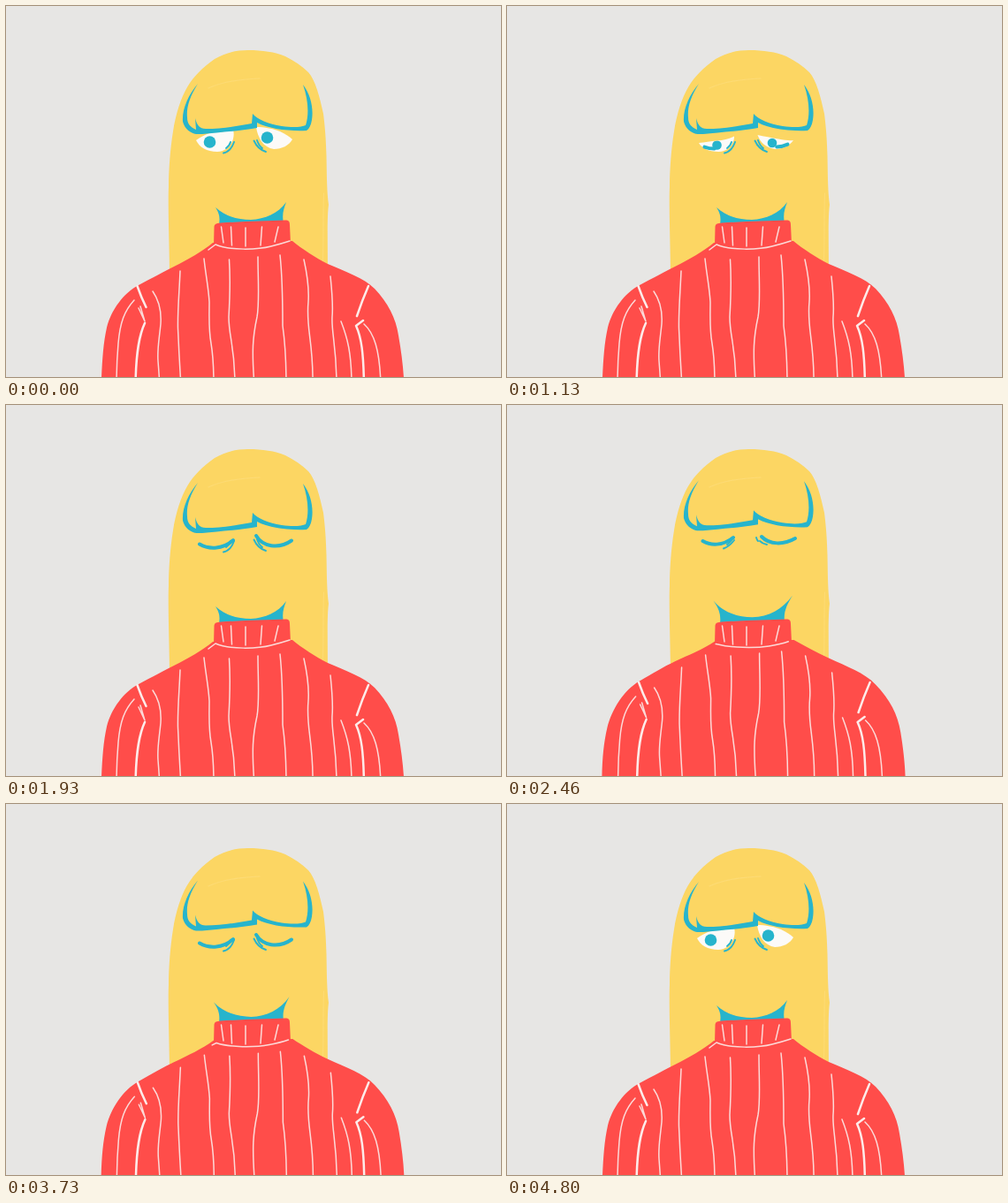
An HTML page that plays this animation: 560x420 px, repeating every 5000 ms.

```html
<!DOCTYPE html>
<html lang="en">
<head>
<meta charset="utf-8">
<title>Sigh</title>
<style>
  html, body { margin: 0; width: 100%; height: 100%; overflow: hidden; background: #e7e6e4; }
  svg { display: block; width: 560px; height: 420px; }
  .hair { fill: #fcd663; }
  .blue { fill: #27b4cc; }
  .red { fill: #ff4d4a; }
  .white { fill: #fcfaf8; }
  .line { fill: none; stroke-linecap: round; stroke-linejoin: round; }
  .ink { stroke: #27b4cc; }
  .knit { stroke: #fcdad8; }
  .shine { stroke: #fddb75; stroke-width: 1.1; }
</style>
</head>
<body>
<svg viewBox="0 0 560 420">
  <defs>
    <clipPath id="clipL"><path id="holeL"/></clipPath>
    <clipPath id="clipR"><path id="holeR"/></clipPath>
  </defs>

  <path class="hair" d="M185 305C185 280 183 225 184 205C184 185 186 160 189 142C192 122 198 104 205 92C212 80 222 70 236 60C248 53 260 50 274 50C290 50 304 52 316 57C326 62 335 68 342 75C350 84 355 103 359 122C361 138 362 152 362.500 170C363 195 363 210 365 225C363 240 364 270 364 305Z"/>
  <path class="line shine" d="M229 93C242 87 258 83 287 82M359.500 212C358.500 240 359.500 262 358.500 288"/>

  <path id="eyeL" class="white"/>
  <path id="eyeR" class="white"/>
  <g clip-path="url(#clipL)"><circle id="pupilL" class="blue"/></g>
  <g clip-path="url(#clipR)"><circle id="pupilR" class="blue"/></g>
  <path id="lashL" class="line ink" stroke-width="4" pathLength="100"/>
  <path id="lashR" class="line ink" stroke-width="4" pathLength="100"/>
  <path id="bagL" class="line ink" stroke-width="1.9"/>
  <path id="bagR" class="line ink" stroke-width="1.9"/>

  <path id="fringe" class="blue" d="M217 87C207 103 204 115 205 125C205 132 208 136 215 139L214 126C216 134 219 138 226 138C244 138 262 135 278 132L279 121C284 127 297 133 312 135C325 137 335 136 339 134C343 122 342 105 336 88C345 100 348 115 346 128C345 134 343 138 340 140C320 141 297 138 284 131L284 137C262 141 240 142 222 144C218 144 217 144 215 144C209 143 202 138 200 130C199 116 206 100 217 87Z"/>

  <path id="neck" class="blue"/>
  <path id="body" class="red"/>
  <path class="red" d="M235.500 251C235.500 247 237 246 243 245.500C270 244 295 243 316 242.500C320 242.500 321 244 321 248L322 269C305 274 255 276 235 271Z"/>

  <g class="line knit" stroke-width="1.5">
    <path d="M243.500 250L246 268M254.500 250L255.500 271M271 251V272M289.500 250L288 271M308 250L304 267"/>
    <path id="seam"/>
    <g id="ribs">
      <path d="M145 333C134 345 129 358 127 382Q125 405 125 430"/>
      <path d="M166 323C173 333 176 345 175 360C173 380 171 388 172 402Q173 415 174 430"/>
      <path d="M197 300C196 325 194 345 194.500 365Q196 400 198 430"/>
      <path d="M224 286C226 305 229 318 230 335C230 352 229 365 232 382Q235 400 235 430"/>
      <path d="M252.500 287C254 310 253 335 252 352C252 375 259 385 259 430"/>
      <path d="M285 284C285 310 287 335 284 352C279 375 278 390 281 430"/>
      <path d="M310 282C313 310 313 340 313 362Q317 390 317 430"/>
      <path d="M337 287C341 305 343 320 342 335C339 365 348 380 347 430"/>
      <path d="M367 306C369 325 370 340 369 352C368 370 374 385 374 430"/>
      <path d="M379 357C386 375 391 392 391 430"/>
      <path d="M405 360C416 370 423 388 424 430"/>
      <path d="M150 342L157 357L152 340"/>
      <g stroke="#fdebe9" stroke-width="2.5">
        <path d="M148.500 317Q153 330 158.500 341M157 359C151 372 147 390 146.500 430"/>
        <path d="M410 317Q403 333 397 351M404 356L396 362C402 375 404.500 392 405 430"/>
      </g>
    </g>
  </g>
</svg>

<script>
const LOOP = 5000, TICK = 66;
const $ = id => document.getElementById(id);
const lerp = (a, b, k) => a + (b - a) * k;
const set = (id, attrs) => {
  for (const name in attrs) $(id).setAttribute(name, attrs[name]);
};

// Blend two paths that share the same commands.
const mix = ([from, to], k) => {
  const ends = to.match(/[\d.]+/g);
  let i = 0;
  return from.replace(/[\d.]+/g, n => lerp(+n, +ends[i++], k).toFixed(2));
};

// Fraction of a run of n held drawings, the first one shown at start.
const steps = (t, start, n) =>
  Math.min(n, Math.max(0, Math.floor((t - start) / TICK) + 1)) / n;

// Chest and chin lift: [time, amount]
const breaths = [[0, 0], [2000, .35], [2260, .6], [2660, 1.04], [3330, 1],
  [3460, .8], [3530, .6], [3730, .35], [4000, 0]];

const neck = [
  "M237 228C248 238 262 242 277 242C293 241 308 235 317 222C314 230 312 236 314 246L241 248C242 240 242 236 237 228Z",
  "M231 217C242 232 260 239 278 239C298 239 314 229 327 211C319 223 313 231 314 246L241 248C242 237 240 229 231 217Z"
];
const body = [
  "M108 421C109 400 110 382 114 364C119 344 133 325 150 316C165 308 180 300 190 295C206 287 222 278 234 268L324 266C335 275 350 285 364 292C385 301 405 308 417 320C432 336 441 353 444 373C447 390 449 405 450 421Z",
  "M107 421C107 400 109 382 113 366C118 346 131 321 150 310C165 301 175 294 190 287C206 280 222 275 236 267L325 266C337 271 350 277 364 283C384 293 404 300 417 314C434 331 443 349 446 368C449 388 451 405 451 421Z"
];
const seam = [
  "M229 276L237 270C252 277 285 276 300 272Q312 269 321 266",
  "M237 270L239 271C254 274.5 278 275.5 296 273Q310 271 318 268"
];

const eyes = {
  L: {
    shape: [
      "M215 152C221 148 227 144 235 143C243 143 250 142 257 140C260 150 253 165 239 165C227 165 219 160 215 152Z",
      "M219 158C226 161 234 162 240 162C247 161 253 159 257 155C255 160 248 165 240 165C229 165 222 162 219 158Z"
    ],
    lash: ["M219 157.5C230 164 246 163 257 153", "M221.5 154C230 159 244 160 256 150"],
    bag: [
      "M258 154C256 160 252 165 246 166.5M254 154Q253 158 249 161",
      "M257 153C254 157 249 161 245 162.5M254 153Q252 156 249 158"
    ],
    pupil: [[230.5, 154], [237.5, 157.5]],
    grow: [12, 40]
  },
  R: {
    shape: [
      "M283 137C292 137 303 139 310 142C316 145 321 148 324 151C320 158 312 162 303 162C291 160 285 150 283 137Z",
      "M284 155C289 158 296 159 304 159C312 159 319 157 324 153C319 159 312 162 304 162C295 161 288 159 284 155Z"
    ],
    lash: ["M283 148C290 160 308 164 323 153.5", "M288 149C297 158.5 313 158.5 326 151"],
    bag: [
      "M280.5 152.500C283 158 287 163 294 165M284 152Q286 158 290 161",
      "M282 150C282.500 152 283 153 284 154M286 154Q289 157 294 158"
    ],
    pupil: [[295.5, 149], [300, 155]],
    grow: [58, 86]
  }
};

function drawEye(side, shut, look, raised) {
  const eye = eyes[side], closed = shut === 1;
  const d = mix(eye.shape, shut);
  const [from, to] = eye.pupil;
  set("eye" + side, { d, opacity: closed ? 0 : 1 });
  set("hole" + side, { d });
  set("pupil" + side, {
    cx: lerp(from[0], to[0], look),
    cy: lerp(from[1], to[1], look),
    r: closed ? 0 : 6.8 - 3 * shut
  });

  // The lash appears at half shut and spreads to both corners.
  const spread = Math.max(0, shut * 2 - 1);
  const start = lerp(eye.grow[0], 0, spread), end = lerp(eye.grow[1], 100, spread);
  set("lash" + side, {
    d: mix(eye.lash, raised),
    "stroke-dasharray": `${end - start} 300`,
    "stroke-dashoffset": -start,
    opacity: shut < .5 ? 0 : 1
  });
  set("bag" + side, { d: mix(eye.bag, raised) });
}

function draw() {
  const t = performance.now() % LOOP;
  const waking = t >= 4530;
  const breath = breaths.filter(([at]) => t >= at).pop()[1];
  const shut = waking ? 1 - steps(t, 4530, 5) : steps(t, 930, 8);
  const look = waking ? 0 : steps(t, 400, 8);
  const raised = t >= 2460 && t < 3530 ? 1 : 0;

  set("neck", { d: mix(neck, breath) });
  set("body", { d: mix(body, breath) });
  set("seam", { d: mix(seam, Math.min(1, breath * 1.5)) });
  set("ribs", { transform: `translate(${breath} ${-5 * breath})` });
  set("fringe", { transform: `translate(0 ${1 - 4.5 * breath})` });
  for (const side in eyes) drawEye(side, shut, look, raised);
  requestAnimationFrame(draw);
}
draw();
</script>
</body>
</html>
```
